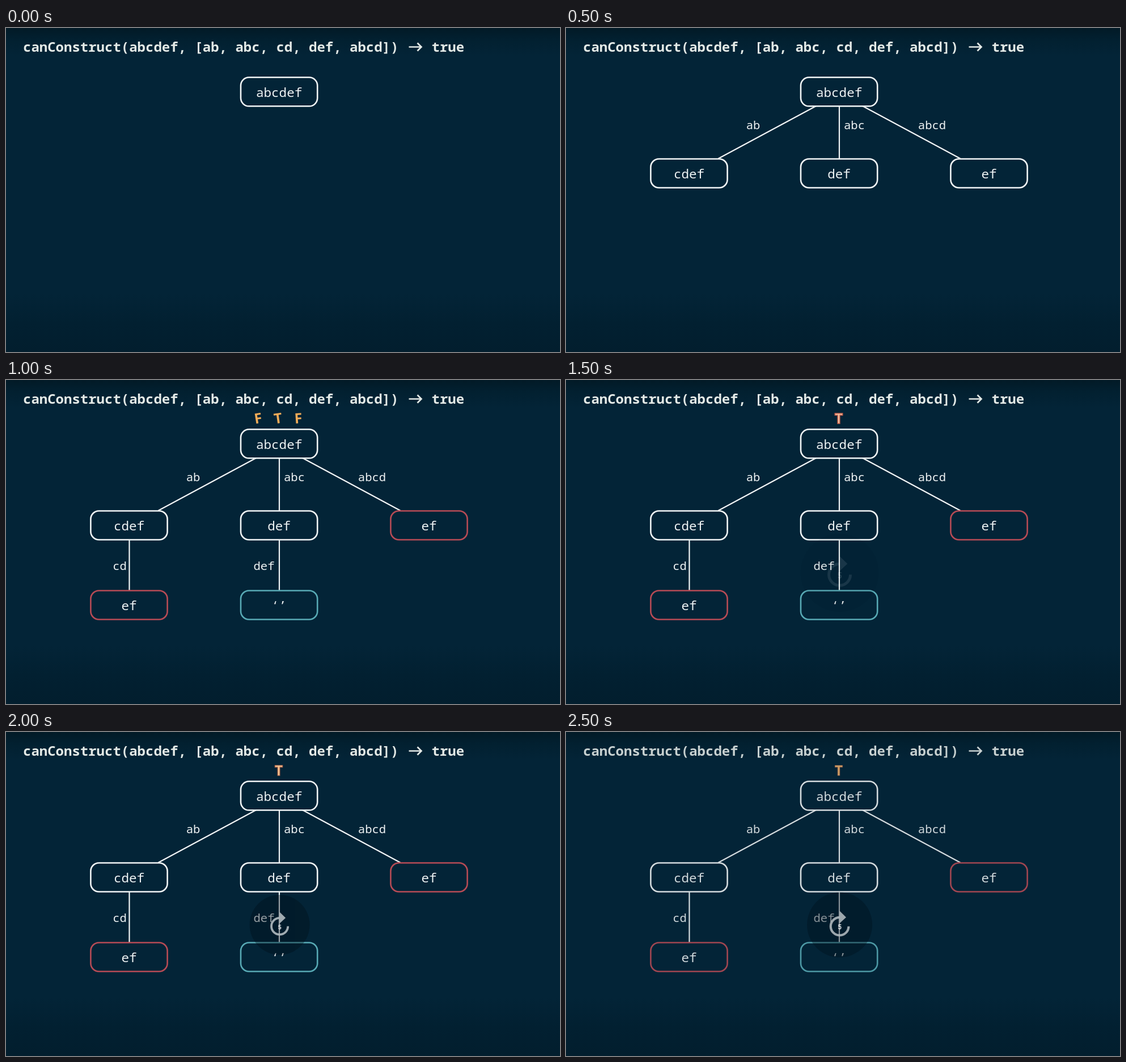
An HTML page for the animation above (3000 ms loop, 977x573 px).

```html
<!DOCTYPE html>
<html lang="en">
<head>
<meta charset="utf-8">
<title>canConstruct</title>
<style>
  html, body { margin: 0; width: 100%; height: 100%; overflow: hidden; background: #032437; }
  svg { display: block; width: 977px; height: 573px; }
  text { font-family: "Noto Sans Mono", "DejaVu Sans Mono", monospace; fill: #eef2f3; white-space: pre; }
  .title { font-size: 24px; font-weight: 600; fill: #e3e9e6; }
  .node { font-size: 22.6px; font-weight: 500; text-anchor: middle; }
  .label { font-size: 20.6px; text-anchor: middle; }
  .mark { font: 700 25px "Noto Sans", sans-serif; text-anchor: middle; fill: #f0ab58; }
  .five { font: 700 11px Roboto, sans-serif; text-anchor: middle; fill: #e6eaec; }
  .line { fill: none; stroke: #f2f5f6; stroke-width: 2.2; }
  rect.line { stroke-width: 2.6; }
</style>
</head>
<body>
<svg viewBox="0 0 977 573">
  <defs>
    <linearGradient id="sky" x1="0" y1="0" x2="0" y2="1">
      <stop offset="0" stop-color="#021a26"/>
      <stop offset=".035" stop-color="#022030"/>
      <stop offset=".085" stop-color="#032437"/>
      <stop offset=".82" stop-color="#032437"/>
      <stop offset=".91" stop-color="#022031"/>
      <stop offset="1" stop-color="#021e2e"/>
    </linearGradient>
  </defs>
  <rect width="977" height="573" fill="url(#sky)"/>
  <g id="scene">
    <text class="title" x="30" y="41.7">canConstruct(abcdef, [ab, abc, cd, def, abcd])</text>
    <path d="M710.5 33.5H732M725.5 26.5L732.5 33.5L725.5 40.5" fill="none" stroke="#e3e9e6" stroke-width="2.7"/>
    <text class="title" x="750.5" y="41.7">true</text>
    <g id="root"></g>
    <g id="kids"></g>
    <g id="leaves"></g>
    <g id="votes"></g>
    <text id="answer" class="mark" x="481" y="76.5">T</text>
  </g>
  <g id="skip">
    <circle r="53" fill="#000f18" fill-opacity=".38"/>
    <path d="M14.6 2.5A14.6 14.6 0 1 1 0 -12.1" fill="none" stroke="#a9b3b8" stroke-width="3.8"/>
    <path d="M0 -22.5L10.5 -12.3L0 -2.5Z" fill="#a9b3b8"/>
    <text class="five" y="7.5">5</text>
  </g>
</svg>
<script>
const NS = "http://www.w3.org/2000/svg";
const $ = id => document.getElementById(id);
const WHITE = "#f2f5f6", RED = "#b84b55", TEAL = "#58aab5";
const COLS = [217, 481.6, 746], ROWS = [112.8, 257, 398];

function add(parent, tag, attrs, text = "") {
  const el = document.createElementNS(NS, tag);
  for (const k in attrs) el.setAttribute(k, attrs[k]);
  el.textContent = text;
  return $(parent).appendChild(el);
}

function node(parent, col, row, text, color = WHITE) {
  const x = COLS[col], y = ROWS[row];
  const box = add(parent, "rect", {
    class: "line", x: x - 67.6, y: y - 25.5, width: 135.2, height: 51, rx: 14.5
  });
  box.style.stroke = color;
  add(parent, "text", { class: "node", x, y: y + 9.2 }, text);
  return box;
}

const edge = (parent, d) => add(parent, "path", { class: "line", d });
const label = (parent, x, y, text) => add(parent, "text", { class: "label", x, y }, text);

node("root", 1, 0, "abcdef");

edge("kids", "M441 138L268.5 231M482 138.5V231.5M523 138L695.5 231");
label("kids", 330, 179.4, "ab");
label("kids", 508.5, 179.4, "abc");
label("kids", 645.5, 179.4, "abcd");
node("kids", 0, 1, "cdef");
node("kids", 1, 1, "def");
const dead = node("kids", 2, 1, "ef");

edge("leaves", "M217.5 282.5V372.5M482 282.5V372.5");
label("leaves", 200.5, 336.4, "cd");
label("leaves", 455, 336.4, "def");
node("leaves", 0, 2, "ef", RED);
node("leaves", 1, 2, "‘’", TEAL);

[["F", 446, -9], ["T", 481, -8], ["F", 516, -4]].forEach(([c, x, turn]) =>
  add("votes", "text", { class: "mark", transform: `translate(${x} 76.5) rotate(${turn})` }, c));

// Look of the answer letter and the skip badge in each half-second step
const ANSWER = {
  3: { fill: "#f0c3a4", stroke: "#c9604b", strokeWidth: 1.5 },
  4: { fill: "#f3c795", stroke: "#b8664a", strokeWidth: 1.1 },
  5: { fill: "#e8ae6c", stroke: "#a9654a", strokeWidth: 0.7 }
};
const SKIP = { 3: [1.3, 0.13], 4: [1, 0.95], 5: [1.085, 0.92] };

const show = (id, on) => $(id).setAttribute("visibility", on ? "visible" : "hidden");

function draw(ms) {
  const step = Math.floor(ms % 3000 / 500);
  show("kids", step >= 1);
  show("leaves", step >= 2);
  show("votes", step === 2);
  show("answer", step >= 3);
  show("skip", step >= 3);
  dead.style.stroke = step >= 2 ? RED : WHITE;
  $("scene").setAttribute("opacity", step === 5 ? 0.88 : 1);
  if (step < 3) return;

  const [scale, alpha] = SKIP[step];
  Object.assign($("answer").style, ANSWER[step]);
  $("skip").setAttribute("transform", `translate(482.6 341) scale(${scale})`);
  $("skip").setAttribute("opacity", alpha);
}

const start = performance.now();
function tick() {
  draw(performance.now() - start);
  requestAnimationFrame(tick);
}
tick();
</script>
</body>
</html>
```
